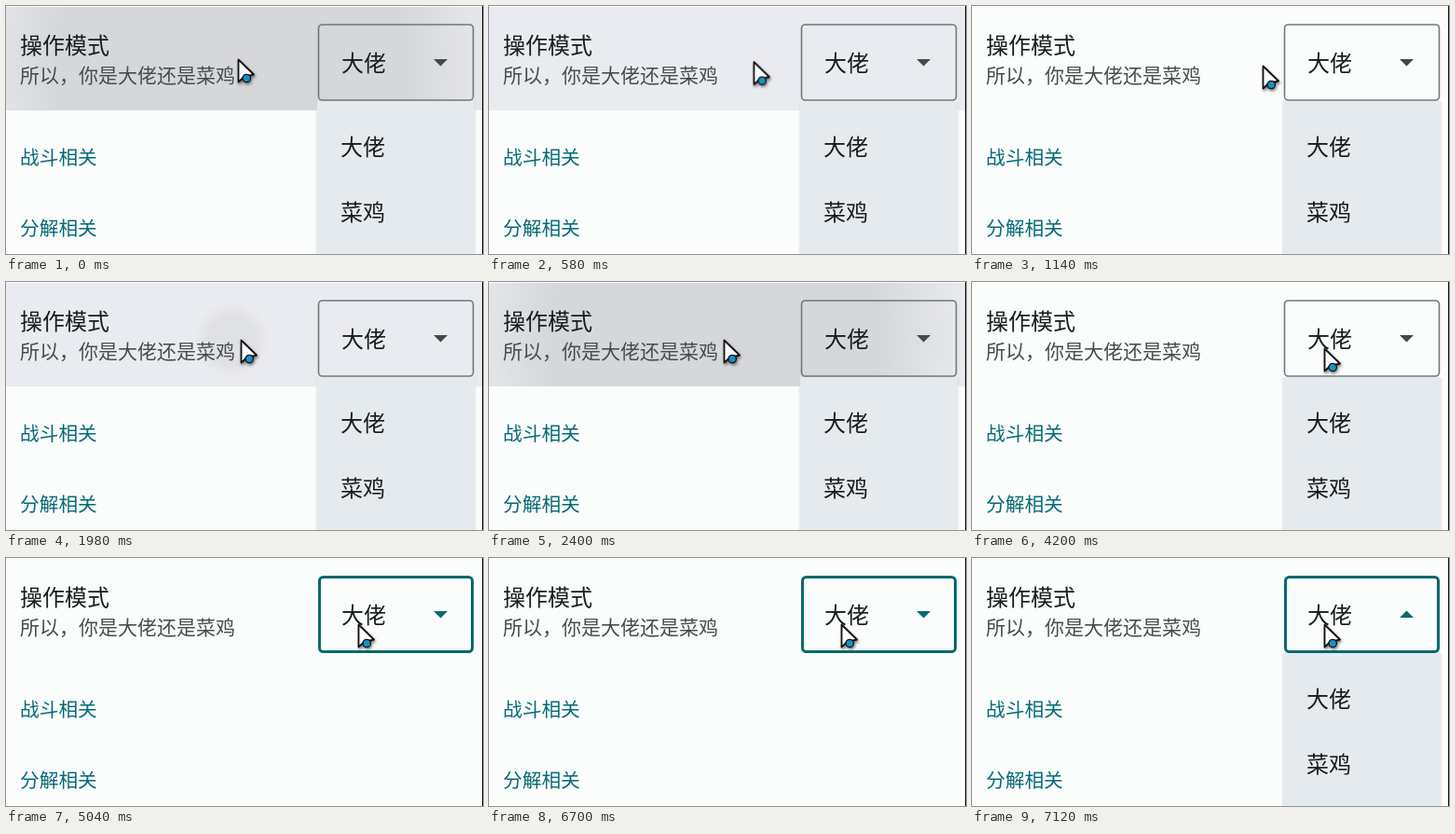
Recreate the animation shown at these times as an HTML page. Size 512 by 266 pixels, loop 8 s.

```html
<!DOCTYPE html>
<html lang="zh-CN">
<head>
<meta charset="utf-8">
<title>操作模式</title>
<style>
  html, body { margin: 0; width: 100%; height: 100%; overflow: hidden; background: #fafdfc; }
  svg { display: block; width: 512px; height: 266px; }
  text { font: 24px "Noto Sans CJK SC", "Noto Sans CJK", sans-serif; fill: #191c1e; }
  .title { font-weight: 500; }
  .note { font-size: 21px; fill: #484b4e; }
  .link { font-size: 20.7px; fill: #066a76; }
  .anim { animation: 8s linear infinite both; }

  .hover { fill: #eaebf0; animation-name: hover; }
  .ripple { transform-origin: 242px 62px; animation-name: ripple; }
  .menu { animation-name: menu; }
  .items { animation-name: items; }
  .thin { fill: none; stroke: #70787a; stroke-width: 1.6; animation-name: blur; }
  .thick { fill: none; stroke: #086a6c; stroke-width: 3; animation-name: focus; }
  .arrow { transform-origin: 466.5px 60.5px; animation-name: arrow; }
  .cursor { animation-name: cursor; filter: drop-shadow(1px 2px 1.5px rgba(0, 0, 0, .5)); }

  @keyframes hover {
    0%, 10.25% { opacity: 1; }
    12.5%, 15.5% { opacity: 0; }
    17.5%, 45.25% { opacity: 1; }
    47.5%, 100% { opacity: 0; }
  }
  /* Each press grows, holds, then fades on release. */
  @keyframes ripple {
    0% { transform: scale(1.06); opacity: 1; }
    1.5% { transform: scale(1.3); opacity: 1; }
    5.5% { transform: scale(1.3); opacity: 0; }
    24.4% { transform: scale(.1); opacity: 0; }
    24.5% { transform: scale(.1); opacity: .4; }
    26% { opacity: 1; }
    30%, 31.25% { transform: scale(1); }
    33.5%, 34.75% { transform: scale(1.3); opacity: 1; }
    38.75%, 100% { transform: scale(1.3); opacity: 0; }
  }
  @keyframes menu {
    0%, 57.5% { opacity: 1; clip-path: inset(0); }
    58.8% { opacity: 1; }
    59.5% { opacity: 0; clip-path: inset(0 0 65% 0); }
    83.75% { opacity: 0; clip-path: inset(0 0 100% 0); animation-timing-function: cubic-bezier(.2, .6, .2, 1); }
    84.5% { opacity: 1; }
    89%, 100% { opacity: 1; clip-path: inset(0); }
  }
  @keyframes items {
    0%, 57.5% { opacity: 1; }
    59%, 84.25% { opacity: 0; }
    88%, 100% { opacity: 1; }
  }
  @keyframes blur {
    0%, 57.5% { opacity: 1; }
    59.5%, 100% { opacity: 0; }
  }
  @keyframes focus {
    0%, 57.5% { opacity: 0; }
    59.5%, 100% { opacity: 1; }
  }
  @keyframes arrow {
    0%, 57.5% { fill: #44484a; transform: none; }
    59.5%, 84% { fill: #086a6c; transform: none; }
    85%, 100% { fill: #086a6c; transform: scaleY(-1); }
  }
  @keyframes cursor {
    0%, 5.5% { transform: translate(249px, 57px); }
    10.25%, 12% { transform: translate(343px, 64px); }
    14.25%, 15.5% { transform: translate(312px, 64px); }
    19.5%, 20.75% { transform: translate(250px, 62px); }
    21%, 34.75% { transform: translate(252px, 62px); }
    38.75%, 40% { transform: translate(251px, 72px); }
    44%, 45.25% { transform: translate(330px, 70px); }
    47.5%, 49.25% { transform: translate(370px, 69px); }
    52.5%, 100% { transform: translate(378px, 71px); }
  }
</style>
</head>
<body>
<svg viewBox="0 0 512 266">
  <defs>
    <clipPath id="row"><path d="M0 1H511V111.500H0Z"/></clipPath>
    <radialGradient id="ink">
      <stop offset=".65" stop-color="#d5d7da"/>
      <stop offset="1" stop-color="#d5d7da" stop-opacity="0"/>
    </radialGradient>
  </defs>

  <g clip-path="url(#row)">
    <rect class="anim hover" width="511" height="112"/>
    <circle class="anim ripple" cx="242" cy="62" r="275" fill="url(#ink)"/>
  </g>

  <text class="title" x="15" y="51">操作模式</text>
  <text class="note" x="15" y="82">所以，你是大佬还是菜鸡</text>
  <text class="link" x="15" y="170">战斗相关</text>
  <text class="link" x="15" y="246">分解相关</text>

  <g class="anim menu">
    <rect x="332.500" y="103" width="172" height="170" fill="#d4dadc" opacity=".4"/>
    <rect x="334" y="102" width="169" height="171" fill="#e4eaee"/>
    <g class="anim items">
      <text x="359" y="160">大佬</text>
      <text x="359" y="230">菜鸡</text>
    </g>
  </g>

  <rect class="anim thin" x="335.500" y="20" width="166" height="81" rx="4"/>
  <rect class="anim thick" x="336.500" y="20.500" width="164" height="80" rx="4"/>
  <text x="360" y="70">大佬</text>
  <path class="anim arrow" d="M459 57H474L466.500 64.500Z"/>
  <path d="M511.500 0V266" stroke="#111"/>

  <g class="anim cursor">
    <path d="M.5 .5V24.500L6.500 19 17 16.500Z" fill="#fff" stroke="#111" stroke-width="1.8" stroke-linejoin="round"/>
    <circle cx="9.200" cy="20.500" r="4.200" fill="#1593c4" stroke="#111" stroke-width="1.300"/>
  </g>
</svg>
</body>
</html>
```
